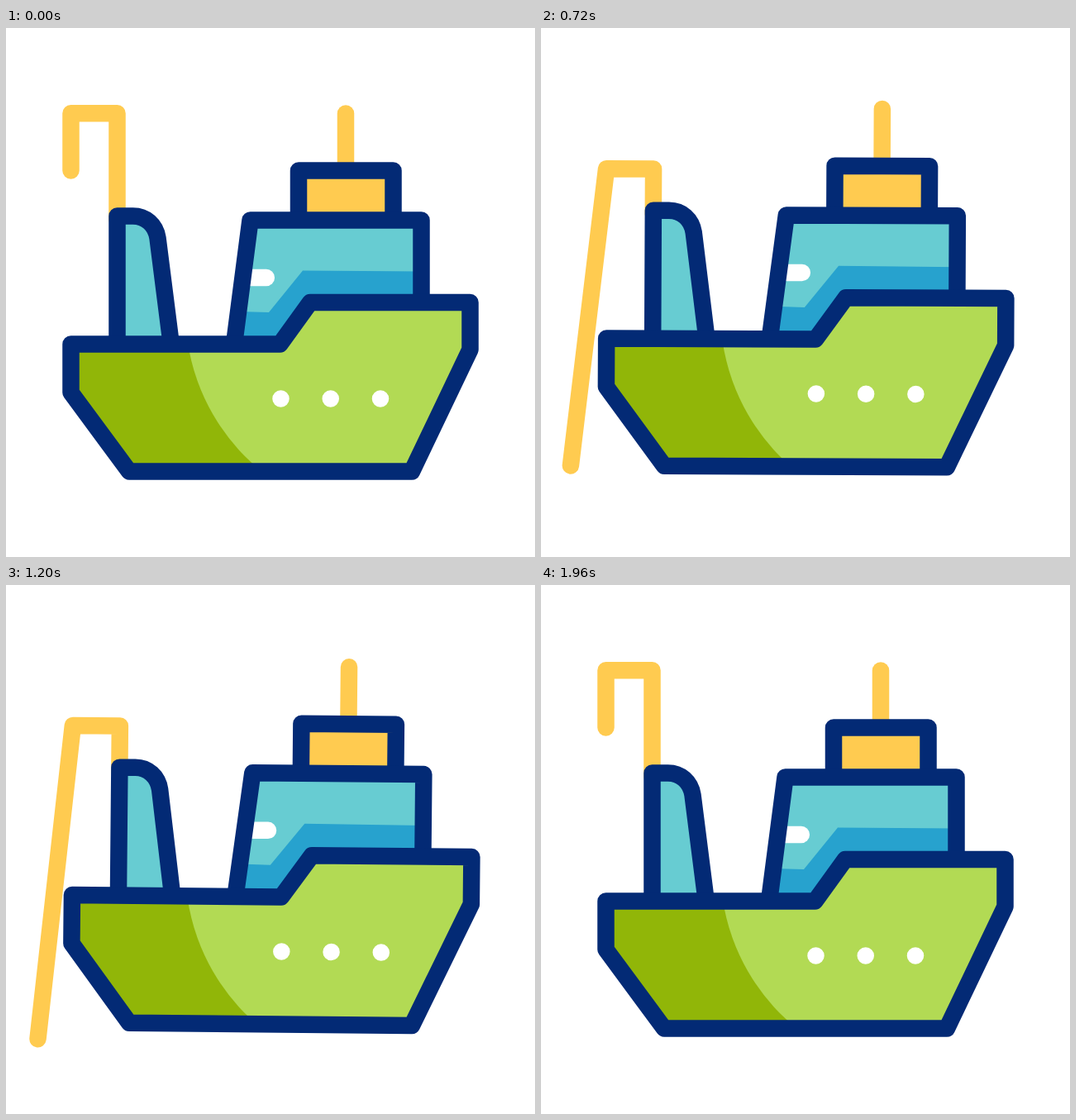
An HTML page for the animation above (2000 ms loop, 640x640 px).

```html
<!DOCTYPE html>
<html lang="en">
<head>
<meta charset="utf-8">
<title>Ship</title>
<style>
  html, body { margin: 0; width: 100%; height: 100%; overflow: hidden; background: #fff; }
  svg { display: block; width: 100vw; height: 100vh; }
  .line { fill: none; stroke: #032a75; stroke-width: 20.5; stroke-linecap: round; stroke-linejoin: round; }
  .gold { stroke: #ffcb50; }
  .white { stroke: #fff; }
</style>
</head>
<body>
<svg viewBox="0 0 640 640">
  <defs>
    <path id="hull" d="M78.5 382.5H331.5L368 332H561.5V389L491 536.5H149L78.5 441Z"/>
    <clipPath id="inHull"><use class="boat" href="#hull"/></clipPath>
  </defs>

  <g class="boat">
    <path id="rope" class="line gold"/>
    <path class="line gold" d="M411 103.5V172"/>

    <path class="line" style="fill:#67ccd2" d="M134.5 382.5V227.5H153.5C169 227.5 181 238 183.5 254L199.8 382.5"/>
    <path class="line" style="fill:#ffcb50" d="M354 232.5V172.5H468.5V232.5"/>

    <path fill="#67ccd2" d="M276 382.5L295.5 232.5H502.5V382.5Z"/>
    <path fill="#27a2ce" d="M276 382.5L281 343L318 344L359 293.5L502.5 294.5V382.5Z"/>
    <path class="line white" d="M296 302H314.8"/>
    <path class="line" d="M276 382.5L295.5 232.5H502.5V332"/>

    <use href="#hull" fill="#91b608"/>
  </g>

  <!-- The light area stays still while the hull rocks over it. -->
  <g clip-path="url(#inHull)">
    <circle cx="466" cy="343" r="249" fill="#b2da54"/>
  </g>

  <g class="boat">
    <path class="line white" stroke-dasharray="0 60.25" d="M332.5 448.5H454"/>
    <use href="#hull" class="line"/>
  </g>
</svg>

<script>
  const LOOP = 2000, STEP = 40;

  const boats = document.querySelectorAll('.boat');
  const rope = document.getElementById('rope');

  // Eased rise from 0 to 1 between two times.
  function ramp(t, from, to) {
    const p = Math.min(1, Math.max(0, (t - from) / (to - from)));
    return p * p * (3 - 2 * p);
  }

  // Rock to each side in turn, then come back to rest.
  const tiltAt = t =>
    -3.5 * ramp(t, 0, 480) + 7.5 * ramp(t, 480, 960) -
    6.1 * ramp(t, 960, 1400) + 2.1 * ramp(t, 1400, 1960);

  const heaveAt = t =>
    -27.5 * ramp(t, 0, 463) + 38.5 * ramp(t, 463, 940) -
    20.5 * ramp(t, 940, 1310) + 9.5 * ramp(t, 1310, 1960);

  // The arm lowers while the rope drops, swings a little, then is reeled in.
  function ropePath(t) {
    const out = 1 - ramp(t, 1312, 1882);
    const drop = ramp(t, 0, 440) * out;
    const settle = ramp(t, 440, 930) * out;
    const tipX = 78.5 - 47 * drop + 7.2 * settle;
    const tipY = 172.5 + 333 * drop + 51.5 * settle;
    const armY = 103.3 + 74 * drop;
    return `M${tipX} ${tipY}L${78.5 - drop} ${armY}H134.5V232`;
  }

  function draw(time) {
    const t = Math.floor((time % LOOP) / STEP) * STEP;
    const pose = `translate(0 ${heaveAt(t)}) rotate(${tiltAt(t)} 320 536.5)`;
    boats.forEach(el => el.setAttribute('transform', pose));
    rope.setAttribute('d', ropePath(t));
  }

  const start = performance.now();
  function tick() {
    draw(performance.now() - start);
    requestAnimationFrame(tick);
  }
  tick();
</script>
</body>
</html>
```
